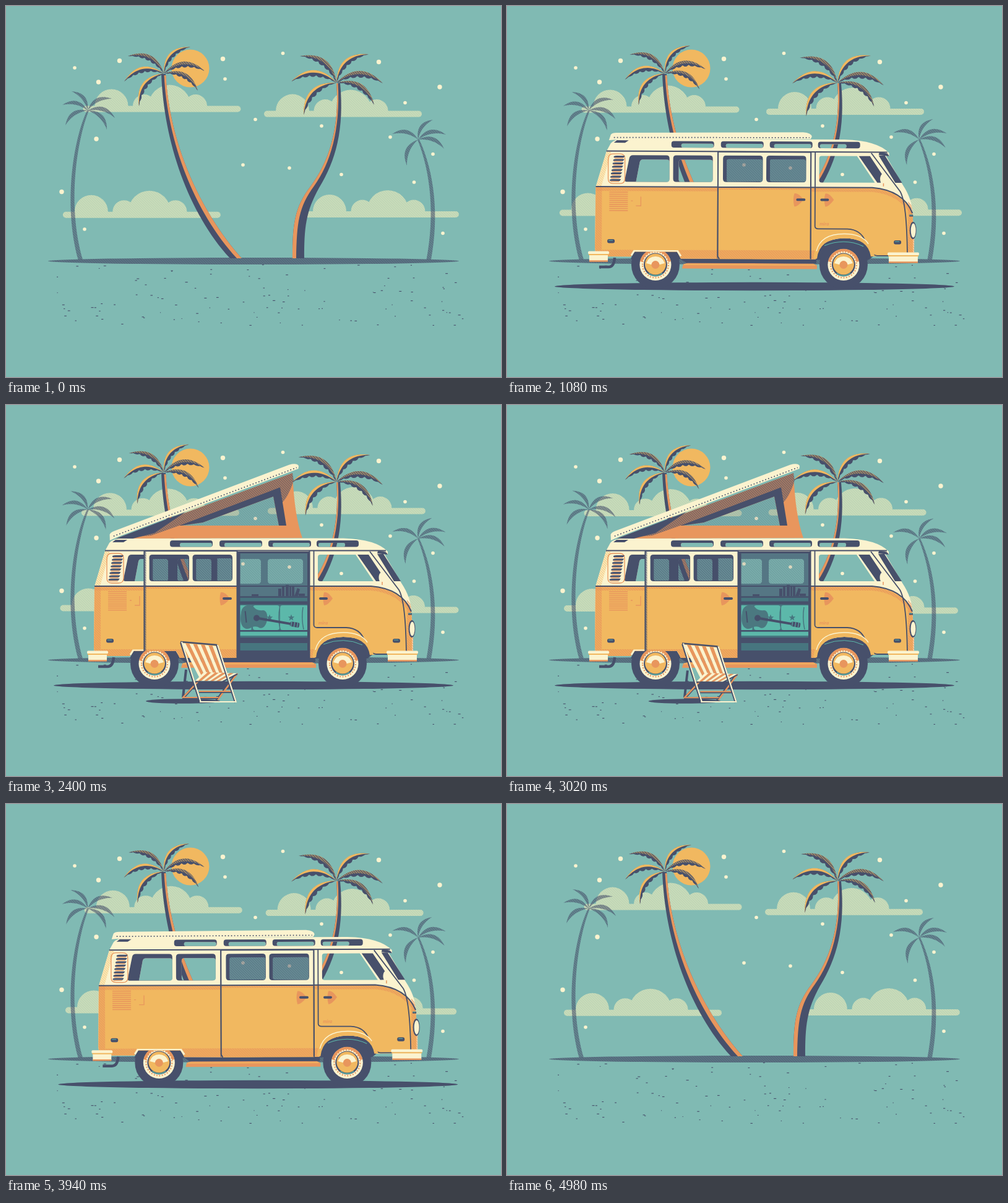
An HTML page with a canvas that plays this animation: 800 by 600 pixels, repeating every 5 s.

```html
<!DOCTYPE html>
<html lang="en">
<head>
<meta charset="utf-8">
<title>Camper by the palms</title>
<style>
html, body { margin: 0; width: 100%; height: 100%; overflow: hidden; background: #80bab3; }
canvas { display: block; }
</style>
</head>
<body>
<canvas id="stage" width="800" height="600"></canvas>
<script>
const ctx = document.getElementById('stage').getContext('2d');
const LOOP = 5000, TAU = Math.PI * 2;
const TEAL = '#80bab3', CREAM = '#fbf3cf', YELLOW = '#f1b860', ORANGE = '#e8965d', NAVY = '#47506b', AQUA = '#5cb8aa';

// Diagonal hatch: a translucent base with finer lines over it
function hatch(color, base, line) {
  const tile = document.createElement('canvas');
  tile.width = tile.height = 4;
  const g = tile.getContext('2d');
  g.fillStyle = color;
  g.globalAlpha = base;
  g.fillRect(0, 0, 4, 4);
  g.globalAlpha = line;
  for (let i = 0; i < 4; i++) {
    g.fillRect(i, i, 1, 1);
    g.fillRect(i, (i + 1) % 4, 1, 1);
  }
  return ctx.createPattern(tile, 'repeat');
}
const CLOUD = hatch('#f3eebb', .54, .22), SLATE = hatch(NAVY, .5, .3), GROUND = hatch(NAVY, .65, .3);
const TINT = hatch(NAVY, .42, .3), HAZE = hatch(NAVY, .12, .12), SHADE = hatch(NAVY, .4, .4);
const RUST = hatch(ORANGE, .35, .6), LEAF = hatch(YELLOW, .15, .45);

const clamp = v => Math.min(1, Math.max(0, v));
const span = (t, a, b) => clamp((t - a) / (b - a));
const inOut = p => p < .5 ? 2 * p * p : 1 - 2 * (1 - p) ** 2;
const outBack = p => 1 + 2.2 * (p - 1) ** 3 + 1.2 * (p - 1) ** 2;
const wave = (t, peak) => Math.cos((t - peak) / LOOP * TAU);

function fill(d, color, rule = 'nonzero') {
  ctx.fillStyle = color;
  ctx.fill(new Path2D(d), rule);
}
function line(d, color, width, dash = []) {
  ctx.strokeStyle = color;
  ctx.lineWidth = width;
  ctx.setLineDash(dash);
  ctx.stroke(new Path2D(d));
  ctx.setLineDash([]);
}
function oval(x, y, rx, ry, color) {
  ctx.fillStyle = color;
  ctx.beginPath();
  ctx.ellipse(x, y, rx, ry, 0, 0, TAU);
  ctx.fill();
}
const disc = (x, y, r, color) => oval(x, y, r, r, color);
function group(draw) {
  ctx.save();
  draw();
  ctx.restore();
}
// Path text of a rounded box
const box = (x, y, w, h, r = 0) => `M${x + r} ${y}h${w - 2 * r}q${r} 0 ${r} ${r}v${h - 2 * r}q0 ${r} ${-r} ${r}` +
  `h${2 * r - w}q${-r} 0 ${-r} ${-r}v${2 * r - h}q0 ${-r} ${r} ${-r}Z`;

// ---------- scenery ----------
const bigStars = [[149.5, 123], [183.5, 88.5], [350.5, 85.5], [602.5, 90.5], [701, 131], [146, 215], [90, 300.5]];
const smallStars = [[111, 100], [354, 118], [447.5, 76.5], [645, 156.5], [403, 183.5], [510, 194], [621, 212],
  [690, 239.5], [659.5, 285], [542, 272.5], [458, 262], [383, 257], [127, 361], [706, 367.5]];

let seed = 11;
const rnd = () => (seed = seed * 16807 % 2147483647) / 2147483647;
const specks = Array.from({ length: 105 }, (_, i) => ({
  x: 82 + rnd() * 655, y: i % 3 ? 462 + rnd() * 54 : 418 + rnd() * 44, w: 1 + rnd() * 3.2
}));

function cloud(x, y) {
  ctx.fillStyle = CLOUD;
  ctx.beginPath();
  for (const [dx, r] of [[46, 27], [99, 18.5], [140, 34], [182, 18.5]]) {
    ctx.moveTo(x + dx - r, y + 1);
    ctx.arc(x + dx, y, r, Math.PI, TAU);
    ctx.lineTo(x + dx + r, y + 1);
  }
  ctx.roundRect(x, y, 255, 10, 5);
  ctx.fill();
}

function frond(cx, cy, tx, ty, sway, front, lit) {
  const turn = sway * (tx < cx ? 1 : -1), c = Math.cos(turn), s = Math.sin(turn);
  const vx = (tx - cx) * c - (ty - cy) * s, vy = (tx - cx) * s + (ty - cy) * c;
  const side = vx > 0 ? 1 : -1, nx = vy * side, ny = -vx * side;
  const at = (p, k) => [cx + vx * p + nx * 2 * p * (1 - p) * k, cy + vy * p + ny * 2 * p * (1 - p) * k];
  const blade = (k0, k1, teeth, color) => {
    ctx.fillStyle = color;
    ctx.beginPath();
    ctx.moveTo(cx, cy);
    for (let i = 1; i <= 20; i++) ctx.lineTo(...at(i / 20, k0));
    for (let i = 19; i >= 0; i--) ctx.lineTo(...at(i / 20, k1 + (teeth && i % 3 === 0 ? .07 : 0)));
    ctx.fill();
  };
  blade(.52, .23, front, front ? NAVY : SLATE);
  if (front) blade(.53, lit ? .42 : .38, false, lit ? YELLOW : LEAF);
}
function crown(cx, cy, tips, sway, front) {
  tips.forEach(([x, y], i) => frond(cx, cy, x, y, sway, front, i > 0 && i < 4));
}

function scenery(t) {
  disc(298, 101, 30.5, YELLOW);
  cloud(123.4 + 3.4 * wave(t, 4000), 165.5 + 4.5 * wave(t, 2900));
  cloud(420 + 3 * wave(t, 2600), 168.2 + 3 * wave(t, 4140));
  cloud(90 + 6 * wave(t, 4000), 328 + 4.7 * wave(t, 100));
  cloud(476.5 + 3.6 * wave(t, 1150), 329.3 + 2.8 * wave(t, 4800));
  bigStars.forEach(([x, y]) => disc(x, y, 3.7, CREAM));
  smallStars.forEach(([x, y]) => disc(x, y, 2.8, CREAM));
  ctx.fillStyle = NAVY;
  specks.forEach(s => ctx.fillRect(s.x, s.y, s.w, 1.1));

  const sway = .028 * (1 - Math.cos(t / LOOP * TAU * 3));
  fill('M131 169C109 215 92 320 116.500 410H124C98 320 115 215 134 169Z', SLATE);
  crown(132, 169, [[106, 138], [91, 160], [96, 193], [171, 150], [176, 181], [163, 200]], -sway);
  fill('M665 216C687 270 693 340 679.500 410H687C700 340 693 270 668 216Z', SLATE);
  crown(666, 216, [[624, 207], [648, 258], [690, 184], [711, 208], [708, 231]], sway);
  oval(400, 412.5, 332, 5.5, GROUND);

  fill('M251 110C255 220 295 335 362 408H381C312 330 264 220 258 110Z', NAVY);
  fill('M255.500 112C261 220 304 332 373 408H381C312 330 264 220 258.500 112Z', ORANGE);
  crown(255, 109, [[197, 81], [191, 122], [215, 162], [298, 66], [321, 105], [310, 137]], sway, true);
  fill('M540 125C547 200 533 250 506 294C484 333 482 360 482 408H463C463 350 467 325 492 292C520 255 540 200 534 125Z', NAVY);
  fill('M534 125C540 200 520 255 492 292C467 325 463 350 463 408H469C470 350 473 325 498 291C524 255 541 200 536.500 125Z', ORANGE);
  crown(534, 124, [[475, 81], [461, 122], [481, 176], [586, 78], [609, 125], [595, 160]], -sway, true);
}

// ---------- camper ----------
const OUTER = 'M160 236L167 223Q173 215.500 190 215.500H545Q598 217 617 237V242L611 240L639 288Q655 312 655 335L658 372V404' +
  'H590Q585 375 545 375Q503 376 499 409H281L275 398H206L200 406H150Q142 404 142 390L143 293Z';
const REAR_WINDOW = 'M197 247Q198 242 203 242H257Q262 242 262 247V280Q262 285 257 285H193Q189 285 190 281Z';
const REAR_GLASS = 'M214 253Q215 249 219 249H258Q262 249 262 253V281Q262 285 258 285H208Z';
const CAB_GLASS = 'M508 242H565L594 285H508Q504 285 504 281V246Q504 242 508 242Z';
const VENTS = [[265, 281, 333], [345, 353, 413], [424, 431, 491], [502, 505, 548]];
const SLOTS = VENTS.map(([, a, b]) => box(a, 223, b - a, 6.5, 3)).join('');
const SHELL = OUTER + REAR_GLASS + box(277, 249, 55, 36, 4) + CAB_GLASS + SLOTS + box(340.5, 237, 150, 172);
const DOOR_GLASS = box(348.5, 242, 64.5, 43, 5) + box(418.5, 242, 64.5, 43, 5);
const DOOR_INNER = box(354.5, 248, 57.5, 36, 3) + box(424.5, 248, 57.5, 36, 3);

function wheel(x, travel) {
  disc(x, 418.5, 39, NAVY);
  group(() => {
    ctx.translate(x, 418.5);
    disc(0, 0, 25.5, CREAM);
    line('M-23 -5A23.500 23.500 0 0 1 23 -5', ORANGE, 4);
    ctx.rotate(travel / 39);
    line('M-21 0A21 21 0 1 1 21 0A21 21 0 1 1 -21 0', ORANGE, 2, [2, 2.4]);
  });
  disc(x, 418.5, 19, NAVY);
  line(`M${x - 11} 432A17 17 0 0 0 ${x + 11} 432`, AQUA, 1.5);
  disc(x, 417.5, 17, YELLOW);
  fill(`M${x - 15} 416Q${x - 11} 405 ${x} 405Q${x + 11} 405 ${x + 15} 416Q${x} 421 ${x - 15} 416Z`, CREAM);
  disc(x, 418.5, 6.5, ORANGE);
}

function guitar() {
  group(() => {
    ctx.translate(402, 344);
    ctx.rotate(.17);
    fill('M-23 -3C-25 -19 -9 -22 -2 -15Q4 -12 11 -14C23 -16 24 16 11 15Q4 12 -2 16C-10 24 -23 20 -23 -3Z', '#4b7880');
    disc(3, 0, 5, NAVY);
    ctx.fillStyle = NAVY;
    ctx.fillRect(3, -2, 57, 4);
    fill(box(58, -4, 15, 8, 2), NAVY);
    line('M60 -4V4M65 -4V4M70 -4V4', AQUA, 1);
    line('M-17 -8L-12 10', NAVY, 2);
  });
}

function star(x, y) {
  ctx.beginPath();
  for (let i = 0; i < 10; i++) {
    const a = i * Math.PI / 5 - Math.PI / 2, r = i % 2 ? 2.3 : 5.5;
    ctx.lineTo(x + r * Math.cos(a), y + r * Math.sin(a));
  }
  ctx.fill();
}

function interior(open) {
  if (!open) return;
  const panes = box(352, 249, 60, 40, 5) + box(423, 249, 57, 40, 5);
  group(() => {
    ctx.beginPath();
    ctx.rect(490.5 - open, 237, open, 172);
    ctx.clip();
    fill(box(340, 237, 150, 73) + panes, '#557684', 'evenodd');
    fill(panes, HAZE);
    fill(box(340, 309, 150, 100), '#47757f');
    line('M340 310.500H490', NAVY, 2.5);
    line('M340 320H490', NAVY, 5);
    fill('M440 309V297h5v12ZM446 309V293h4v16ZM452 309V291h5v18ZM458 309V292h3v17ZM462 309V294h4v15ZM466 309L471 296l4 2L472 309ZM473 309V305h10v4ZM397 309V306h11v3Z', NAVY);
    fill(box(345, 324, 53, 40, 4) + box(399, 324, 43, 40, 4) + box(443, 324, 46, 40, 4), AQUA);
    line('M442.500 327Q439 344 443 363M398 327Q401 344 397 363M480 327Q477 344 481 363', '#47757f', 1.5);
    ctx.fillStyle = '#47757f';
    star(426, 344);
    star(461, 344);
    guitar();
    line('M340 365H490M340 377H490', NAVY, 2);
    line('M345 370H490', AQUA, 6);
    fill(box(340, 377, 150, 8) + box(340, 397, 150, 12), NAVY);
    fill(box(490.5 - open, 237, 5, 172) + box(487, 237, 4, 172) + box(340, 236, 150, 4), NAVY);
  });
}

function handle(x, fan) {
  fill(`M${fan} 313Q${x + 3} 301 ${x - 3} 303Q${x - 6} 313 ${x - 3} 324Q${x + 2} 325 ${fan} 313Z`, ORANGE);
}

function sideDoor(open) {
  // Pillars behind the sliding glass read as dark
  if (open) group(() => {
    ctx.clip(new Path2D(SHELL), 'evenodd');
    ctx.translate(-open, 0);
    fill(DOOR_GLASS, NAVY);
  });
  group(() => {
    if (open) ctx.clip(new Path2D(OUTER));
    ctx.translate(-open, 0);
    fill(DOOR_INNER, TINT);
    fill(DOOR_GLASS + DOOR_INNER, NAVY, 'evenodd');
    fill(box(340.5, 236.5, 150, 57) + DOOR_GLASS, CREAM, 'evenodd');
    fill(box(340.5, 293, 150, 116.5), YELLOW);
    fill(box(340.5, 395, 150, 14), RUST);
    fill(box(340.5, 294, 150, 3), RUST);
    handle(467, 479);
    fill(box(467, 311, 15, 4, 2), NAVY);
    line('M340 293H491M340.500 236V405L343 409.500M490.500 236V409', NAVY, 2);
    line('M340 236H491', NAVY, 2);
    if (open) line('M341.500 237V409', SHADE, 4);
  });
}

function popTop(lift) {
  if (lift > .01) group(() => {
    ctx.translate(0, 216);
    ctx.scale(1, lift);
    ctx.translate(0, -216);
    const hole = 'M318 190L432 148L441 195H283Z';
    fill('M178 216L463 110Q466 180 479 215Z' + hole, ORANGE, 'evenodd');
    fill('M178 216L463 110L465 122Q456 150 444 160L443 133L280 195L235 211Z', SHADE);
    fill('M178 216L290 173L240 207L205 216Z', NAVY);
    fill('M280 195L443 133L453 195Z' + hole, NAVY, 'evenodd');
    fill(hole, HAZE);
  });
  group(() => {
    ctx.translate(170 + 3.5 * lift, 218 - lift);
    ctx.rotate(-.355 * lift);
    ctx.translate(-170, -218);
    fill('M164 218L167 209Q169 206 176 206L478 204Q491 205 492 211L490 215L180 217Z', CREAM);
    line('M172 213.500L488 212.500', NAVY, 1.7, [1.7, 3.3]);
  });
}

function bumper(x, w) {
  fill(box(x, 397.5, w, 5, 2), CREAM);
  fill(box(x + 2, 403, w - 4, 11, 1), CREAM);
  line(`M${x + 1} 403H${x + w - 1}`, YELLOW, 2);
  line(`M${x + 2} 413.500H${x + w - 2}`, ORANGE, 2.5);
}

function bodywork() {
  group(() => {
    ctx.clip(new Path2D(SHELL), 'evenodd');
    fill(box(130, 200, 540, 230), CREAM);
    fill('M130 293H590Q640 297 656 336V430H130Z', YELLOW);
    fill('M130 294H590Q636 298 656 336V342Q636 304 590 300H130Z', RUST);
    fill('M142 293H153V404H142ZM142 395H500V410H142ZM648 315L660 330V405H648Z', RUST);
    fill('M160 236L143 293H152L168 236Z', LEAF);
    VENTS.forEach(([a], i) => fill(box(a, 219, i === 3 ? 68 : 69, 10.5, 4), NAVY));
    fill(REAR_WINDOW + box(268, 242, 64, 43, 5), NAVY);
    fill('M568 242H586L606 272L604 285H598Z', NAVY);
  });
  fill('M600 241H610L638 285H627Z', NAVY);
  fill('M601 236Q615 235 617 242L600 240Z', NAVY);
  fill('M172 222L177 218H196L190 222Z', NAVY);

  line(box(163, 240, 27, 48, 8), ORANGE, 1.3);
  for (let i = 0; i < 8; i++) {
    const y = 243 + i * 5.4, x = 172 - i * .9;
    fill(`M${x} ${y + 1}Q${x + 2} ${y} ${x + 5} ${y}H${x + 18}L${x + 16} ${y + 3}H${x}Z`, NAVY);
    line(`M${x + 1} ${y + 4}H${x + 15}`, ORANGE, 1.2);
  }
  line('M160 235.500H614M143 293H590Q640 297 655 334', NAVY, 2);
  line('M588 237L635 299Q646 318 647 402', NAVY, 1.8);
  line('M497.500 236V356Q498 360 503 360H550Q572 361 579 380Q586 402 598 403H647', NAVY, 1.8);
  line('M340.500 236V409M490.500 236V409', NAVY, 2);

  for (let i = 0; i < 10; i++) line(`M165 ${302 + i * 3.3}H195`, ORANGE, 1.6);
  line('M200 316H203M208 324H216V309', ORANGE, 1.3);
  for (const x of [162, 625]) {
    fill(box(x, 378, 12, 6.5, 3), NAVY);
    line(`M${x + 2} 380H${x + 9}`, AQUA, 1);
  }
  handle(517, 528);
  fill(box(506, 311, 14, 4, 2), NAVY);
  ctx.fillStyle = ORANGE;
  ctx.font = 'italic 700 8px Lato, sans-serif';
  ctx.fillText('mira', 505, 354.5);

  oval(656, 362, 5.5, 14, NAVY);
  oval(656.5, 362, 4, 11.5, CREAM);
  line('M650 338H656', NAVY, 3);
  line('M650 337H655', AQUA, 1);
  oval(606.5, 279, 4, 8, CREAM);
  line('M608 286V291', ORANGE, 1.5);

  line('M201 404L206 396H275L281 405', CREAM, 3);
  line('M203 394H278', YELLOW, 3);
  line('M498 408Q502 372 545 372Q586 372 591 404', YELLOW, 6);
  line('M500 396Q507 368 545 368Q574 368 584 384', CREAM, 1.5);
  line('M513 387Q546 374 576 388', AQUA, 1);
  bumper(131, 34);
  bumper(615, 51);
}

function camper(t, dx) {
  const open = 117 * (inOut(span(t, 1560, 2000)) - inOut(span(t, 3020, 3480)));
  const lift = outBack(span(t, 1130, 1570)) * (1 - inOut(span(t, 3480, 3850)));
  const since = Math.max(0, t - 850);
  const tilt = t < 1640 ? .012 * Math.sin(since / 110) * Math.exp(-since / 250) : -.0104 * inOut(span(t, 3840, 4100));
  ctx.translate(dx, 0);
  oval(400, 453.5, 323, 6.7, NAVY);

  const tilted = draw => group(() => {
    ctx.translate(400, 420);
    ctx.rotate(tilt);
    ctx.translate(-400, -420);
    draw();
  });
  tilted(() => {
    line('M149 423H164Q173 423 174 408', NAVY, 4.5);
    fill('M285 418L292 416H495L501 419V425H283Z', ORANGE);
    line('M286 418.500H498', YELLOW, 1.5);
    fill('M278 408H500V416H290Z', NAVY);
    fill('M497 410Q500 368 545 369Q588 369 592 404L584 410Z', NAVY);
    fill('M200 410L206 396H275L281 410Z', NAVY);
  });
  wheel(240, dx);
  wheel(544, dx);
  tilted(() => {
    interior(open);
    bodywork();
    sideDoor(open);
    popTop(lift);
  });
}

// ---------- deck chair ----------
function stripes(a, b, c, d) {
  const mix = (p, q, k) => `${p[0] + (q[0] - p[0]) * k} ${p[1] + (q[1] - p[1]) * k}`;
  for (let i = 0; i < 9; i++) {
    const u = i / 9, v = (i + 1) / 9;
    fill(`M${mix(a, b, u)}L${mix(a, b, v)}L${mix(d, c, v)}L${mix(d, c, u)}Z`, i % 2 ? ORANGE : CREAM);
  }
}

function chair(size) {
  if (size <= 0) return;
  ctx.translate(322, 481);
  ctx.scale(size, size);
  ctx.translate(-322, -481);
  oval(286, 479, 60, 3.8, NAVY);
  line('M291 428L286 473M340 478L372 435M286 474L321 436', NAVY, 4);
  line('M342 477L374 434M285 474L320 437', ORANGE, 2.5);
  line('M285 474H343M312 464H364', NAVY, 3.5);
  line('M285 473H343M312 463H364', ORANGE, 2);
  stripes([284, 385], [340, 390], [355, 433], [312, 440]);
  stripes([320, 432], [374, 434], [349, 447], [306, 446]);
  line('M306 447.500H350L374 435', NAVY, 2);
  line('M282 383L341 388', NAVY, 2.5);
  line('M283 384L314 481M341 388L371 481', NAVY, 4);
  line('M284 383L315 481M342 388L372 481', CREAM, 2.2);
  line('M313 480H371', CREAM, 2.2);
}

function draw(t) {
  ctx.fillStyle = TEAL;
  ctx.fillRect(0, 0, 800, 600);
  scenery(t);
  const dx = -780 * (1 - span(t, 200, 1090)) ** 2 + 886e-6 * Math.max(0, t - 3850) ** 2;
  if (Math.abs(dx) < 740) group(() => camper(t, dx));
  group(() => chair(outBack(span(t, 1900, 2320)) * (1 - inOut(span(t, 2980, 3340)))));
}

const start = performance.now();
function tick() {
  draw((performance.now() - start) % LOOP);
  requestAnimationFrame(tick);
}
tick();
</script>
</body>
</html>
```
